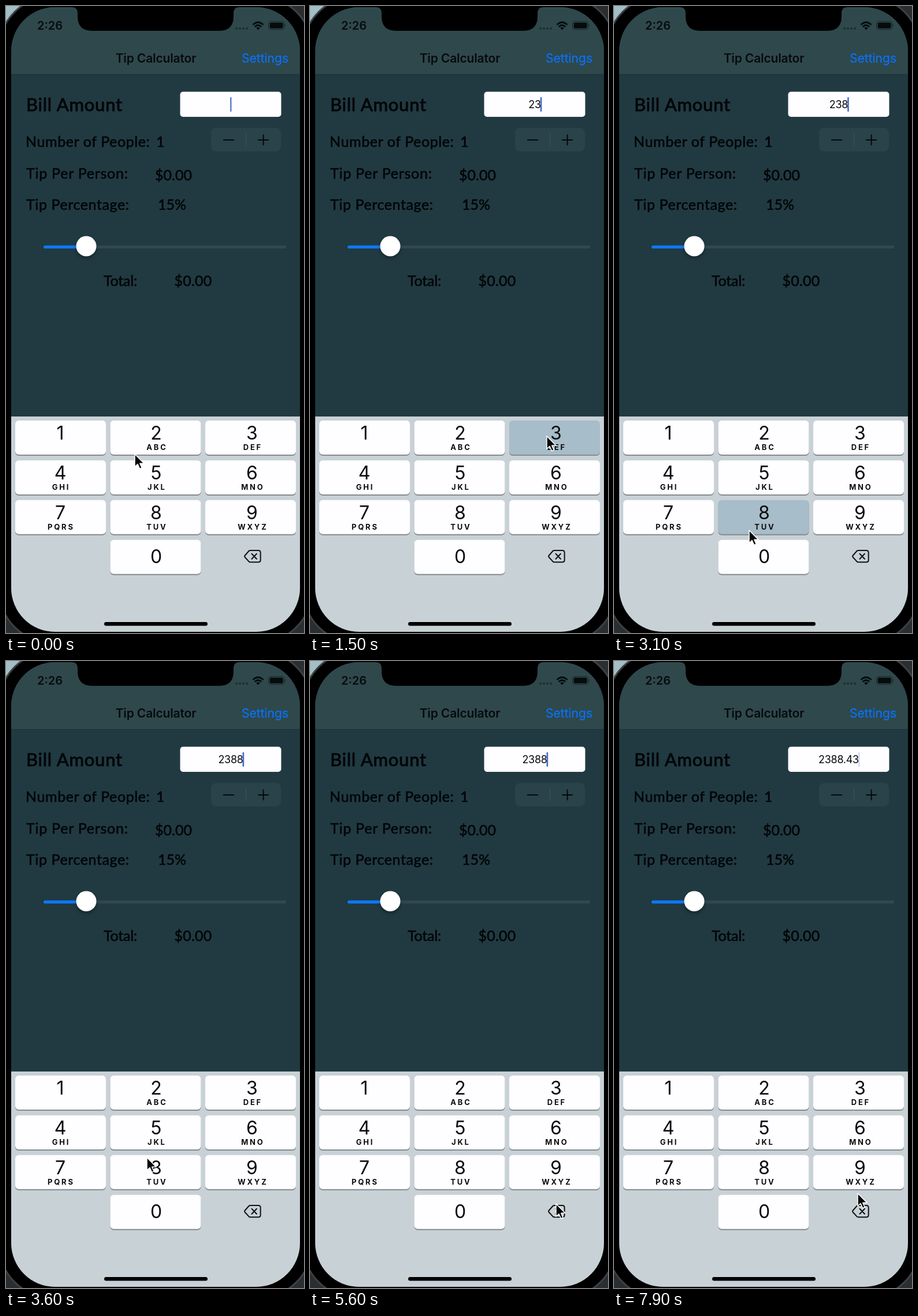
Animation of 516 by 1086 pixels, one loop 8000 ms. Source, as an HTML page:

```html
<!DOCTYPE html>
<html lang="en">
<head>
<meta charset="utf-8">
<title>Tip Calculator</title>
<style>
  html, body { margin: 0; width: 100%; height: 100%; overflow: hidden; background: #000; }
  svg { display: block; width: 516px; height: 1086px; font-family: Inter, Roboto, sans-serif; }
  .hand { font-family: Lato, "Open Sans", sans-serif; font-size: 25px; fill: #020607; stroke: #020607; stroke-width: .6px; }
  .hand .big { font-size: 31px; stroke-width: .9px; }
  .mid, .digit, .sub { text-anchor: middle; }
  .digit { font-size: 32px; fill: #0b0b0d; }
  .sub { font-size: 13px; font-weight: 700; letter-spacing: 2.8px; fill: #0b0b0d; }
  .key { fill: #fefdff; }
  .key.down { fill: #a7bdc9; }
</style>
</head>
<body>
<svg viewBox="0 0 516 1086">
  <defs>
    <clipPath id="screen"><rect x="9" y="2" width="500" height="1082" rx="76"/></clipPath>
    <filter id="soft" x="-50%" y="-50%" width="200%" height="200%"><feGaussianBlur stdDeviation="3"/></filter>
  </defs>

  <rect width="516" height="1086" fill="#2b2e30"/>
  <rect width="40" height="40" fill="#a3bec5"/>
  <rect x="-13" y="-18" width="544" height="1122" rx="96" stroke="#3c4144" stroke-width="3"/>

  <g clip-path="url(#screen)">
    <rect width="516" height="1086" fill="#213a42"/>
    <rect width="516" height="118" fill="#2f484c"/>
    <rect y="118" width="516" height="1" fill="#1b3036"/>
    <rect y="711" width="516" height="375" fill="#c8d1d6"/>
  </g>
  <path d="M114 0V2Q124 2 124 13V18Q124 43 149 43H369Q394 43 394 18V13Q394 2 404 2V0Z"/>

  <g fill="#060b0c">
    <text x="54" y="41" font-size="20" font-weight="600">2:26</text>
    <path d="M399 39H418" stroke="#1d2e31" stroke-width="4" stroke-linecap="round" stroke-dasharray="0 6"/>
    <path d="M427.5 32.5Q436.500 24 445.500 32.500M430.800 36Q436.500 30.500 442.200 36" fill="none" stroke="#060b0c" stroke-width="3"/>
    <path d="M436.500 41.500L433 38Q436.500 35 440 38Z"/>
    <rect x="454.700" y="26.700" width="27" height="14" rx="4" fill="none" stroke="#1c2b2e" stroke-width="1.300"/>
    <rect x="456.700" y="28.700" width="23" height="10" rx="2.300"/>
    <path d="M483 31.500Q486 33.700 483 36Z" fill="#1c2b2e"/>
    <text class="mid" x="259.500" y="98" font-size="21" font-weight="600" letter-spacing="-.15">Tip Calculator</text>
  </g>
  <text x="489" y="98" font-size="21" fill="#0a72f5" stroke="#0a72f5" stroke-width=".3" text-anchor="end">Settings</text>

  <g class="hand">
    <text class="big" x="35" y="182" letter-spacing=".8">Bill Amount</text>
    <text x="34" y="244" letter-spacing=".6">Number of People:</text>
    <text x="260" y="244">1</text>
    <text x="35" y="299" letter-spacing=".75">Tip Per Person:</text>
    <text x="258" y="302">$0.00</text>
    <text x="35" y="353" letter-spacing=".6">Tip Percentage:</text>
    <text x="263" y="353">15%</text>
    <text x="169" y="485" letter-spacing="-.2">Total:</text>
    <text x="291.500" y="485" letter-spacing=".2">$0.00</text>
  </g>

  <rect x="301.500" y="148.500" width="175" height="43.500" rx="5" fill="#fefdff"/>
  <text id="bill" class="mid" x="389" y="177" font-size="18" letter-spacing="-.3" fill="#08080a"></text>
  <rect id="caret" y="158" width="2.600" height="25" rx="1" fill="#4369cb"/>

  <rect x="355" y="211" width="121" height="41" rx="9" fill="#2a4249"/>
  <path d="M376 232H395M436.500 232H455M445.700 222.700V241.300" stroke="#03090b" stroke-width="2"/>
  <path d="M415.500 221V243" stroke="#3a5056" stroke-width="1.300"/>

  <rect x="65" y="414.700" width="420" height="5.400" rx="2.700" fill="#33474e"/>
  <rect x="65" y="414.700" width="74" height="5.400" rx="2.700" fill="#0b78fa"/>
  <circle cx="139" cy="420" r="17.500" opacity=".3" filter="url(#soft)"/>
  <circle cx="139" cy="416" r="17.500" fill="#fff"/>

  <g id="keys"></g>
  <path d="M423 943H437Q440.700 943 440.700 946.700V959.500Q440.700 963.200 437 963.200H423Q421.500 963.200 420.500 962.200L413.500 954.500Q412.500 953.200 413.500 952L420.500 944Q421.500 943 423 943ZM425.500 948.700L434 957.700M434 948.700L425.500 957.700"
    fill="none" stroke="#101214" stroke-width="2" stroke-linecap="round" stroke-linejoin="round"/>
  <rect x="170" y="1067" width="179" height="6.500" rx="3.250"/>

  <path id="pointer" d="M0 0V22L5 17.600L8.600 25.600L12.200 24L8.800 16.200H16Z" fill="#050505" stroke="#fff" stroke-width="1.500" stroke-linejoin="round"/>
</svg>

<script>
const LOOP = 8000, STEP = 100, HOLD = 200;
const $ = id => document.getElementById(id);
const clamp = v => Math.min(1, Math.max(0, v));
const smooth = p => p * p * (3 - 2 * p);

const letters = ['', 'ABC', 'DEF', 'GHI', 'JKL', 'MNO', 'PQRS', 'TUV', 'WXYZ'];

function key(n) {
  const i = n ? n - 1 : 10, col = i % 3;
  const x = 16 + 164.5 * col, y = 718 + 68.9 * Math.floor(i / 3), cx = 94 + 166 * col;
  return `<rect x="${x}" y="${y + 1.5}" width="157" height="59.5" rx="6" fill="#868b8f"/>
    <rect id="k${n}" class="key" x="${x}" y="${y}" width="157" height="59" rx="6"/>
    <text class="digit" x="${cx}" y="${y + (n ? 33 : 40)}">${n}</text>
    <text class="sub" x="${cx + 1.4}" y="${y + 51}">${n ? letters[i] : ''}</text>`;
}
$('keys').innerHTML = [...Array(10).keys()].map(key).join('');

// The first four characters are tapped on the keypad, the rest come from a keyboard.
const typing = [
  { ch: '2', at: 600, tap: true }, { ch: '3', at: 1400, tap: true },
  { ch: '8', at: 3000, tap: true }, { ch: '8', at: 3400, tap: true },
  { ch: '.', at: 6300 }, { ch: '4', at: 6900 }, { ch: '3', at: 7300 }
];

// Each glide eases the pointer from where it rests to a new spot.
const rest = { x: 223, y: 776 };
const glides = [
  { from: 0, to: 300, x: 250, y: 750 },
  { from: 700, to: 1300, x: 410, y: 745 },
  { from: 1600, to: 2600, x: 234, y: 908 },
  { from: 3100, to: 3500, x: 244, y: 860 },
  { from: 3800, to: 4600, x: 426, y: 948 },
  { from: 5000, to: 6400, x: 426, y: 928 },
  { from: 7500, to: 7700, x: 422, y: 922 }
];

function pointerAt(t) {
  return glides.reduce((pos, g) => {
    const p = smooth(clamp((t - g.from) / (g.to - g.from)));
    return { x: pos.x + (g.x - pos.x) * p, y: pos.y + (g.y - pos.y) * p };
  }, rest);
}

// One blink per second, restarted by every keystroke.
const blink = age => clamp(1 + 1.28 * Math.sin(2 * Math.PI * age / 1000));

function draw(now) {
  const t = Math.floor(now % LOOP / STEP) * STEP;
  const done = typing.filter(k => k.at <= t);
  const last = done.length ? done[done.length - 1].at : -520;

  const bill = $('bill');
  bill.textContent = done.map(k => k.ch).join('');
  const width = done.length ? bill.getComputedTextLength() : 0;
  $('caret').setAttribute('x', 388 + width / 2);
  $('caret').setAttribute('opacity', blink(t - last));

  for (const { ch } of typing.filter(k => k.tap)) {
    const down = done.some(k => k.tap && k.ch === ch && t < k.at + HOLD);
    $('k' + ch).classList.toggle('down', down);
  }
  const { x, y } = pointerAt(t);
  $('pointer').setAttribute('transform', `translate(${x} ${y})`);
}

const start = performance.now();
function tick() {
  draw(performance.now() - start);
  requestAnimationFrame(tick);
}
tick();
</script>
</body>
</html>
```
